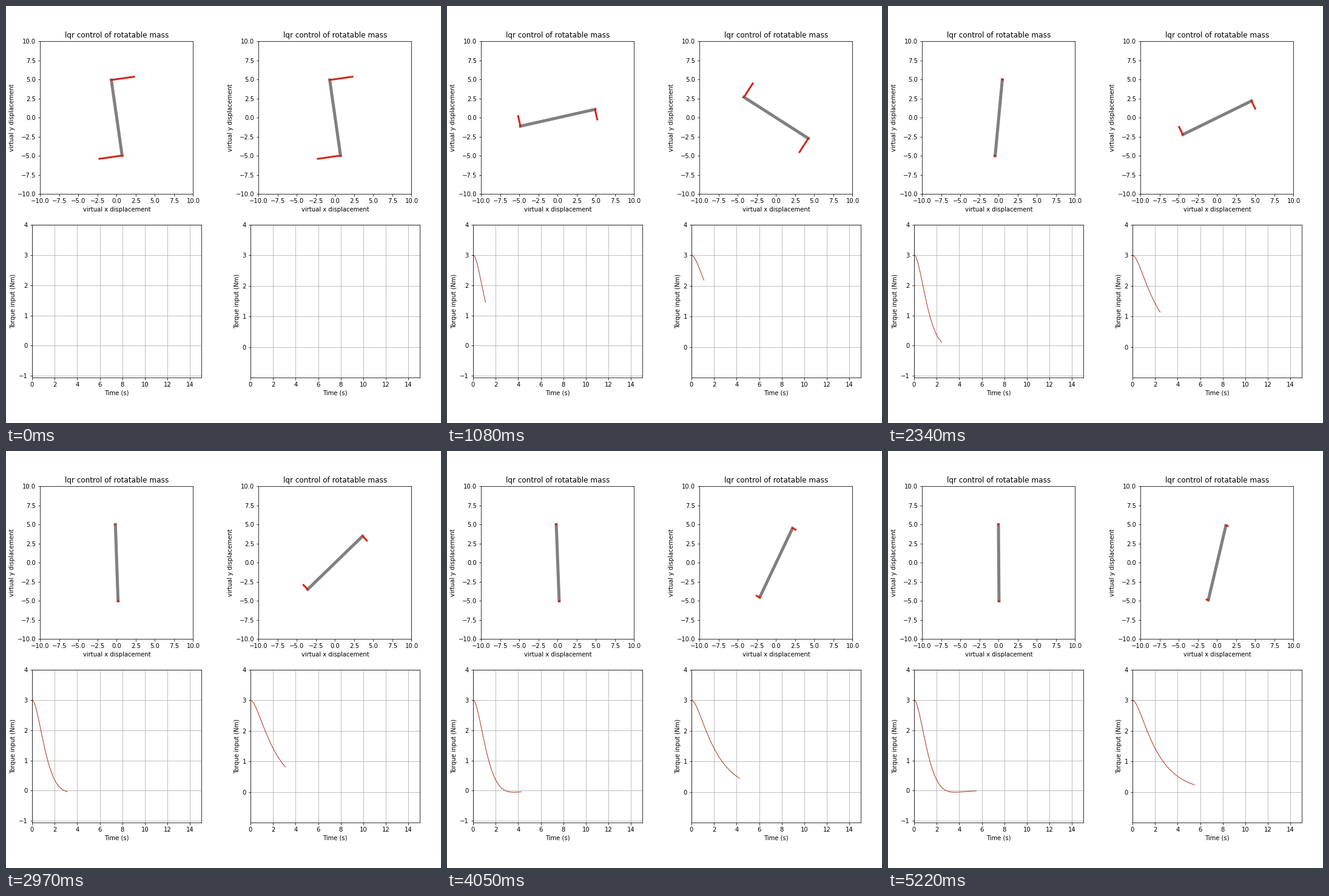
These frames come from a looping animation (717x688 px, 5300 ms). A matplotlib script:

```python
import numpy as np
import matplotlib.pyplot as plt
from matplotlib.animation import FuncAnimation

W, H, DPI = 717, 688, 72
FRAMES, LOOP_MS = 59, 5300
DT, STEPS = 0.05, 300
RED, CURVE = "#d2261a", "#b8402a"

fig = plt.figure(figsize=(W / DPI, H / DPI), dpi=DPI, facecolor="white")
times = np.arange(STEPS) * DT


def response(stiffness, damping, start=3.0):
    """Free decay of x'' = -stiffness x - damping x', released at rest."""
    root = np.sqrt(complex(damping**2 / 4 - stiffness))
    s1, s2 = -damping / 2 + root, -damping / 2 - root
    x = (s1 * np.exp(s2 * times) - s2 * np.exp(s1 * times)) / (s1 - s2)
    return start * x.real


def add_axes(left, bottom, width, height):
    return fig.add_axes([left / W, bottom / H, width / W, height / H])


class Panel:
    def __init__(self, left, theta, ymin, yticks):
        self.theta = theta

        arm = add_axes(left + 13.49, 377.6, 252, 252)
        arm.set(xlim=(-10, 10), ylim=(-10, 10),
                title="lqr control of rotatable mass",
                xlabel="virtual x displacement",
                ylabel="virtual y displacement")
        ticks = np.arange(-10, 10.1, 2.5)
        arm.set_xticks(ticks)
        arm.set_yticks(ticks)
        self.bar, = arm.plot([], [], color="gray", lw=5)
        self.forces = [arm.plot([], [], color=RED, lw=3)[0] for _ in range(2)]

        plot = add_axes(left, 75.2, 279, 252)
        plot.set(xlim=(0, 15), ylim=(ymin, 4),
                 xlabel="Time (s)", ylabel="Torque input (Nm)")
        plot.set_xticks(range(0, 15, 2))
        plot.set_yticks(yticks)
        plot.grid(True)
        self.curve, = plot.plot([], [], color=CURVE, lw=1.1)

    def show(self, i):
        th = self.theta[i]
        phi = 1.5 * np.pi - th
        end = 5 * np.array([np.cos(phi), np.sin(phi)])
        push = th * np.array([np.sin(phi), -np.cos(phi)])
        self.bar.set_data(*zip(end, -end))
        for line, sign in zip(self.forces, (1, -1)):
            line.set_data(*zip(sign * end, sign * (end + push)))
        self.curve.set_data(times[:i], self.theta[:i])
        return [self.bar, *self.forces, self.curve]


panels = [
    Panel(43, response(2, np.sqrt(5)), -1.05, range(-1, 5)),
    Panel(403, response(1, np.sqrt(6)), -0.99, range(0, 5)),
]


def update(frame):
    i = int(1.91 * frame + 0.75)
    return [artist for p in panels for artist in p.show(i)]


anim = FuncAnimation(fig, update, frames=FRAMES, interval=LOOP_MS / FRAMES,
                     repeat=True, repeat_delay=0, blit=False)
plt.show()
```
